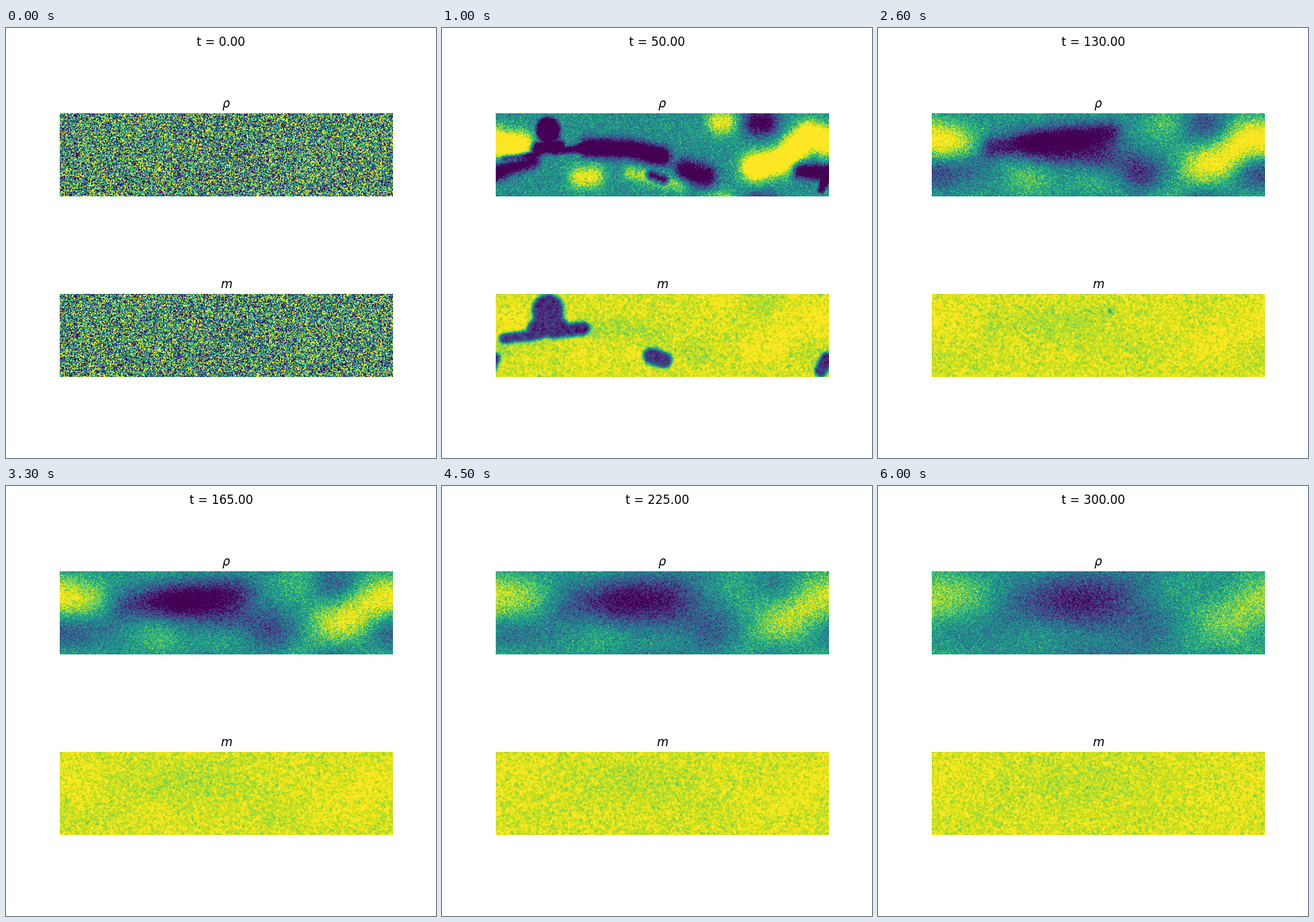
Recreate the animation shown at these times as a matplotlib script. Size 600x600 px, loop 6100 ms.

```python
import numpy as np
import matplotlib.pyplot as plt
from matplotlib.animation import FuncAnimation

NX, NY = 400, 100          # grid cells
W, H = 465.0, 116.25       # periodic box, in pixels
FRAMES, DT = 61, 5.0
T_ORDER, T_GONE = 50.0, 130.0   # order sets in; last droplet vanishes
DIFFUSION, DRIFT = 1.6, 0.12
SPEED, SHRINK = 2.2, 5.7   # droplet velocity and loss of radius squared

# Density ridges: amplitude, width, path (x may run past the box and wrap)
RIDGES = [
    (.9, 14, [(362, 76), (400, 66), (437, 32), (475, 44), (498, 47)]),
    (-.95, 9, [(130, 49), (185, 50), (230, 60)]),
    (-.75, 11, [(265, 80), (292, 88)]),
    (-.8, 8, [(425, 80), (460, 84), (515, 66)]),
    (.5, 12, [(118, 90), (135, 88)]),
    (.35, 8, [(188, 84), (256, 99)]),
    (.5, 13, [(311, 13), (319, 13)]),
    (-.6, 13, [(364, 14), (376, 14)]),
]

# Reversed domains: radius and the two ends of a capsule
DOMAINS = [
    (21.4, (73, 23), (73, 26)),
    (13.5, (58, 49), (88, 47)),
    (7, (12, 63), (60, 57)),
    (9, (80, 54), (122, 49)),
    (11, (217, 87), (235, 93)),
    (9, (462, 91), (454, 107)),
]

X, Y = np.meshgrid((np.arange(NX) + .5) * W / NX,
                   (np.arange(NY) + .5) * H / NY)
KX = 2 * np.pi * np.fft.rfftfreq(NX, W / NX)
KY = 2 * np.pi * np.fft.fftfreq(NY, H / NY)[:, None]
K2 = KX ** 2 + KY ** 2


def wrap(d, size):
    return (d + size / 2) % size - size / 2


def spread(field, sigma, shift=0.0):
    """Periodic Gaussian blur with a sideways shift."""
    kernel = np.exp(-.5 * sigma ** 2 * K2 - 1j * KX * shift)
    return np.fft.irfft2(np.fft.rfft2(field) * kernel, s=field.shape)


def diffuse(field, age):
    return spread(field, np.sqrt(2 * DIFFUSION * age), DRIFT * age)


def distance(a, b, shift=0.0):
    """Distance to the segment from a to b in the periodic box."""
    (x0, y0), (x1, y1) = a, b
    ax, ay = (x1 - x0) / 2, (y1 - y0) / 2
    dx = wrap(X - (x0 + x1) / 2 - shift, W)
    dy = wrap(Y - (y0 + y1) / 2, H)
    s = np.clip((dx * ax + dy * ay) / (ax * ax + ay * ay + 1e-9), -1, 1)
    return np.hypot(dx - s * ax, dy - s * ay)


def ridge(amp, width, path):
    d = np.min([distance(a, b) for a, b in zip(path, path[1:])], axis=0)
    return amp * np.exp(-.5 * (d / width) ** 2)


def domain_depth(t):
    """Depth inside the drifting, shrinking domains; negative outside."""
    age = t - T_ORDER
    depth = np.full((NY, NX), -30.0)
    for r, a, b in DOMAINS:
        r2 = r * r - SHRINK * age
        if r2 > 0:
            d = distance(a, b, SPEED * age)
            depth = np.maximum(depth, np.sqrt(r2) - d)
    return depth


START = np.random.default_rng(7).normal(size=(NY, NX))
ORDERED = sum(ridge(*r) for r in RIDGES)


def slow_density(t):
    if t <= T_ORDER:
        return ORDERED * t / T_ORDER
    # The large droplet leaves a thin wake behind it.
    head = 73 + SPEED * (min(t, T_GONE) - T_ORDER)
    wake = ridge(-.45, 11, [(85, 49), (head, 27)])
    wake *= min((t - T_ORDER) / 30, 1)
    age = t - T_ORDER
    return diffuse(ORDERED, age) + diffuse(wake, max(t - T_GONE, 0))


def state(i):
    """Density and magnetisation, scaled to 0..1."""
    t = i * DT
    if i == 0:
        field = .52 + .52 * START
        return field, field
    rng = np.random.default_rng(100 + i)
    order = min(t / T_ORDER, 1.0)
    depth = domain_depth(t)
    slow = slow_density(t)
    if order < 1:
        rough = spread(START, np.sqrt(2 * DIFFUSION * t))
        rough /= rough.std()
        depth = (1 - order) * (-12 * rough - 3) + order * depth
        slow = slow + .35 * (1 - order) * rough
    flipped = spread((depth > 0).astype(float), 2.2)
    core = np.clip((depth - 1) / 9, 0, 1)

    rho = .5 + slow - (.25 + .6 * order) * core
    rho += .125 * rng.normal(size=rho.shape)
    grain = spread(rng.normal(size=rho.shape), .8)
    m = .935 + .08 * np.clip(slow, -.7, .7) - .81 * flipped
    m += .055 * grain / grain.std()
    return rho, m


fig, axes = plt.subplots(2, 1, figsize=(6, 6), dpi=100)
heading = fig.suptitle("t = 0.00", y=.982)
images = []
for ax, name, field in zip(axes, (r"$\rho$", "$m$"), state(0)):
    images.append(ax.imshow(field, cmap="viridis", vmin=0, vmax=1))
    ax.set_title(name)
    ax.axis("off")


def update(i):
    for image, field in zip(images, state(i)):
        image.set_data(field)
    heading.set_text(f"t = {i * DT:.2f}")
    return [*images, heading]


anim = FuncAnimation(fig, update, frames=FRAMES, interval=100, repeat=True)
plt.show()
```
